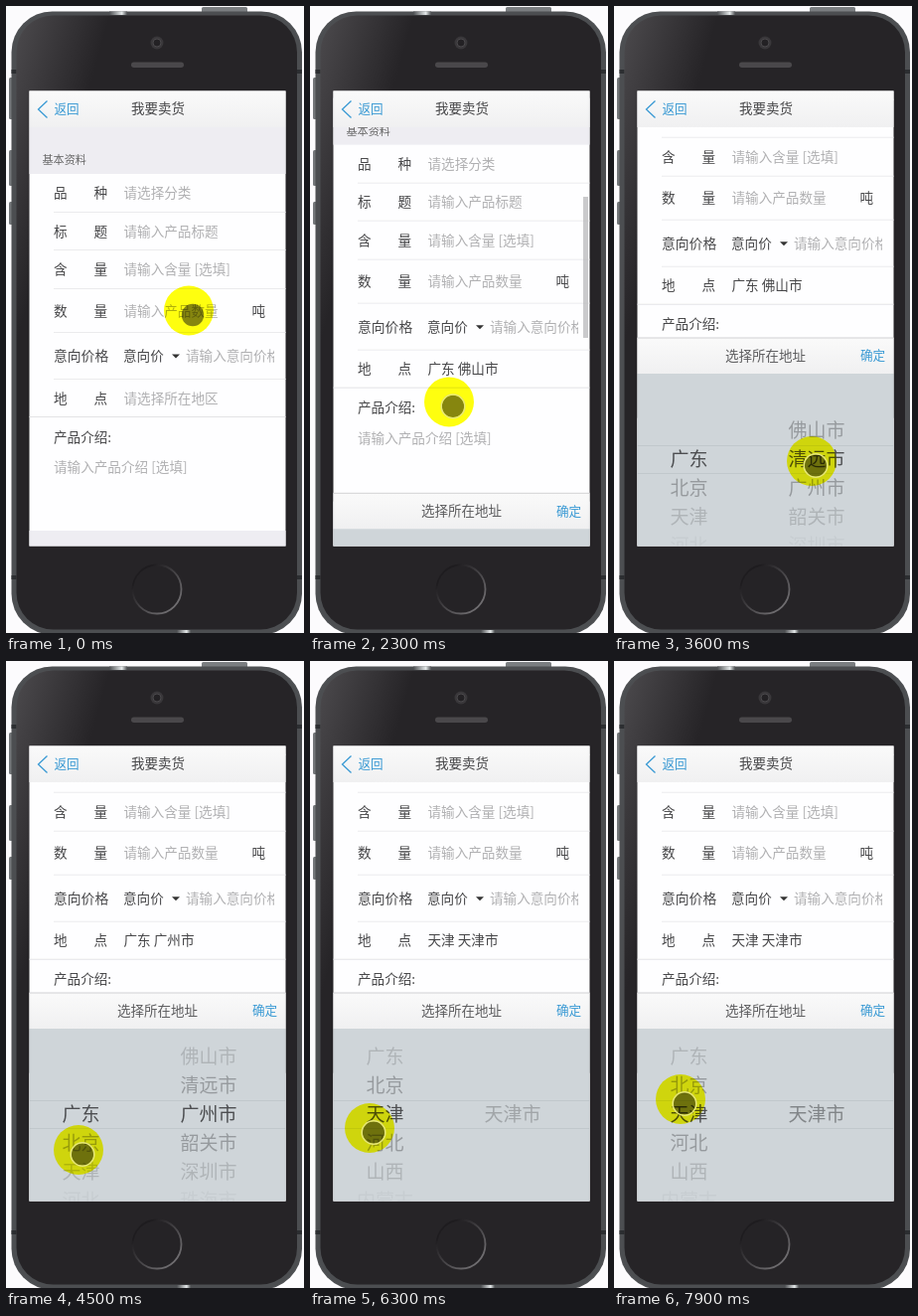
Recreate the animation shown at these times as an HTML page. Size 300 px wide and 631 px high, loop 8 s.

```html
<!DOCTYPE html>
<html lang="zh-CN">
<head>
<meta charset="utf-8">
<style>
html, body { margin: 0; width: 100%; height: 100%; overflow: hidden; background: #fcfbfd; }
svg { display: block; width: 300px; height: 631px; }
text { font-family: "Noto Sans CJK SC", "Noto Sans CJK", sans-serif; font-weight: 300; white-space: pre; }
#cursor { mix-blend-mode: multiply; opacity: .94; }
</style>
</head>
<body>
<svg id="stage" viewBox="0 0 300 631"></svg>
<script>
const LOOP = 8000, ROW = 29, MID = 456, DRAG = 400, GRIP = 26, OPEN = 2250;
const INK = '#464648', HINT = '#b0b0b2', BLUE = '#3a9ad4';

const text = (x, cy, s, size = 13.6, fill = INK, extra = '') =>
  `<text x="${x}" y="${cy + size * 0.38}" font-size="${size}" fill="${fill}" ${extra}>${s}</text>`;
const rect = (x, y, w, h, fill, extra = '') =>
  `<rect x="${x}" y="${y}" width="${w}" height="${h}" fill="${fill}" ${extra}/>`;
const circle = (x, y, r, fill, extra = '') =>
  `<circle cx="${x}" cy="${y}" r="${r}" fill="${fill}" ${extra}/>`;
const gradient = (id, stops, dir = 'x2="0" y2="1"') =>
  `<linearGradient id="${id}" ${dir}>` + stops.map(([o, c]) =>
    `<stop offset="${o}" stop-color="${c}"/>`).join('') + '</linearGradient>';
const clip = (id, x, y, w, h) => `<clipPath id="${id}">${rect(x, y, w, h, '#000')}</clipPath>`;
const line = (x, y, fill = '#ebebed') => rect(x, y, 282 - x, 1, fill);

const defs = `<defs>
  ${gradient('bar', [[0, '#fafafa'], [1, '#f0f0f1']])}
  ${gradient('shine', [[0, '#4c4e51'], [.7, '#e4e8e9'], [1, '#4c4e51']], '')}
  ${gradient('body', [[0, '#4c4a4d'], [.3, '#262427']], 'x2=".8" y2=".5"')}
  ${gradient('home', [[.2, '#1e1c1f'], [1, '#828083']], 'x2="1" y2="1"')}
  ${clip('screen', 23.5, 85.5, 258, 458)}
  ${clip('price', 180, 0, 90, 631)}
  ${clip('wheels', 23.5, 370, 258, 174)}
</defs>`;

const phone =
  rect(197, 1, 46, 7, '#7a7d80', 'rx="1.5"') +
  [[72, 42], [145, 36], [197, 23]].map(([y, h]) => rect(3, y, 6, h, '#737679', 'rx="1.5"')).join('') +
  rect(5.5, 5.5, 292.5, 627, '#4c4e51', 'rx="41"') +
  rect(104, 5.5, 18, 3.5, 'url(#shine)') + rect(172, 628, 14, 3, 'url(#shine)') +
  [64, 573].map(y => rect(5.5, y, 5, 4, '#2c2e31') + rect(293, y, 5, 4, '#2c2e31')).join('') +
  rect(10.5, 9.5, 282.5, 618, 'url(#body)', 'rx="37"') +
  circle(152, 37, 6.5, '#39373a') + circle(152, 37, 4, '#232124', 'stroke="#4b494c"') +
  rect(126, 56.5, 53, 5.5, '#4a484b', 'rx="2.75"') +
  circle(152, 587, 24.5, '#252326', 'stroke="url(#home)" stroke-width="1.8"');

const field = ([cy, a, b, hint, id = '']) =>
  text(48, cy, a) + text(88.5, cy, b) + text(118.5, cy, hint, 13.6, HINT, id);

const form = `<g id="form">
  ${rect(23, 122, 259, 47, '#eeedf2')}
  ${text(36.5, 155, '基本资料', 11.1, '#666')}
  ${[207, 245, 284, 328, 375].map(y => line(48, y)).join('')}${line(23, 413, '#e3e3e5')}
  ${[[188, '品', '种', '请选择分类'],
     [226.5, '标', '题', '请输入产品标题'],
     [265, '含', '量', '请输入含量 [选填]'],
     [306.5, '数', '量', '请输入产品数量'],
     [394.5, '地', '点', '', 'id="place"']].map(field).join('')}
  ${text(247.5, 306.5, '吨')}
  ${text(48, 352, '意向价格', 13.8)}${text(118, 352, '意向价')}
  <path d="M167 350.5h8l-4 4z" fill="#333"/>
  <g clip-path="url(#price)">${text(181, 352, '请输入意向价格', 13.6, HINT)}</g>
  ${text(48, 433.5, '产品介绍:')}
  ${text(48, 464, '请输入产品介绍 [选填]', 13.6, HINT)}
  ${rect(23, 528, 259, 130, '#eeedf2')}
</g>`;

const header = rect(23, 85, 259, 37, 'url(#bar)') +
  `<path d="M41.5 95.5l-9 8.5 9 8.5" fill="none" stroke="${BLUE}" stroke-width="1.3"/>` +
  text(48.5, 103, '返回', 12.6, BLUE) + text(126, 103, '我要卖货', 13.5);

const sheet = `<g id="sheet">
  ${rect(23, 334, 259, 36, 'url(#bar)')}${line(23, 333.5, '#d2d2d4')}
  ${text(112, 351.5, '选择所在地址', 13.5, '#5c5c5e')}${text(248, 351.5, '确定', 12.6, BLUE)}
  ${rect(23, 370, 259, 174, '#cfd5d9')}${line(23, 442, '#c1c8cc')}${line(23, 470, '#c1c8cc')}
  <g clip-path="url(#wheels)"><g id="left"></g><g id="right"></g></g>
</g>`;

const $ = id => document.getElementById(id);
$('stage').innerHTML = defs + phone + `<g clip-path="url(#screen)">
  ${rect(23, 85, 259, 459, '#fefeff')}${form}${header}
  ${rect(275, 192, 5, 142, '#b9b9bb', 'id="scrollbar"')}${sheet}</g>
  <g id="cursor">${circle(0, 0, 25, '#ff0')}${circle(4, 4.5, 11.2, '#808000')}</g>
  ${circle(4, 4.5, 11.8, 'none', 'id="ring" stroke="#e6e678" stroke-width="1.5"')}`;

const provinces = ['广东', '北京', '天津', '河北', '山西', '内蒙古', '辽宁', '吉林'];
const cities = [
  ['佛山市', '清远市', '广州市', '韶关市', '深圳市', '珠海市'],
  ['北京市'],
  ['天津市'],
  ['石家庄市', '唐山市', '秦皇岛市', '邯郸市']
];

// Each drag: start time, release point, wheel and rows turned.
const drags = [
  { at: 3400, x: 196, y: 432, wheel: 'right', rows: 2 },
  { at: 4850, x: 67, y: 466, wheel: 'left', rows: 1 },
  { at: 5850, x: 60, y: 470, wheel: 'left', rows: 1 },
  { at: 6430, x: 72, y: 461, wheel: 'left', rows: 1 },
  { at: 7370, x: 67, y: 441, wheel: 'left', rows: -1 }
];

// Cursor keys [time, x, y]: the opening glide, then rest, travel and drag for each gesture.
const path = [[0, 184, 306.5], [900, 149, 374], [1500, 145, 350], [1800, 140, 399], [2700, 140, 398]];
for (const d of drags) {
  const [free, x, y] = path[path.length - 1], gap = d.at - free;
  const grab = [d.x + 6, d.y + d.rows * GRIP];
  d.reach = free + gap * .65;
  path.push([free + gap * .5, x, y], [d.reach, ...grab], [d.at, ...grab], [d.at + DRAG, d.x, d.y]);
}

function ramp(t, from, to) {
  const u = Math.min(1, Math.max(0, (t - from) / (to - from)));
  return u * u * (3 - 2 * u);
}

function cursorAt(t) {
  const i = path.findIndex(k => k[0] > t);
  if (i < 0) return path[path.length - 1].slice(1);
  const [t0, x0, y0] = path[i - 1], [t1, x1, y1] = path[i], e = ramp(t, t0, t1);
  return [x0 + (x1 - x0) * e, y0 + (y1 - y0) * e];
}

const turned = (wheel, share) =>
  drags.reduce((sum, d) => sum + (d.wheel === wheel ? d.rows * share(d) : 0), 0);

const wheelRows = (items, x, pos, alpha = 1) => items.map((s, i) => {
  const d = Math.abs(i - pos), a = Math.max(.75 - .43 * d, .46 - .14 * d, 0) * alpha;
  return text(x, MID + (i - pos) * ROW, s, 19, '#222224', `text-anchor="middle" opacity="${a.toFixed(3)}"`);
}).join('');

function draw(t) {
  const open = ramp(t, 2150, 2600), chosen = t >= OPEN;
  const moving = d => ramp(t, d.at, d.at + DRAG), done = d => t >= d.at + DRAG ? 1 : 0;
  const province = turned('left', done), list = cities[province];
  const city = province ? 0 : turned('right', done);
  const last = drags.filter(d => d.wheel === 'left' && done(d)).pop();

  $('form').setAttribute('transform', `translate(0 ${-113.3 * open})`);
  $('sheet').setAttribute('transform', `translate(0 ${211 * (1 - open)})`);
  $('scrollbar').setAttribute('opacity', ramp(t, 2200, 2350) - ramp(t, 3100, 3400));
  $('place').textContent = chosen ? `${provinces[province]} ${list[city]}` : '请选择所在地区';
  $('place').setAttribute('fill', chosen ? INK : HINT);

  const fresh = last ? ramp(t, last.at + DRAG - 150, last.at + DRAG + 350) : 1;
  $('left').innerHTML = wheelRows(provinces, 75.5, turned('left', moving));
  $('right').innerHTML = wheelRows(list, 204, province ? 0 : turned('right', moving), fresh);

  const down = t >= 1900 && t < 3000 || drags.some(d => t >= d.reach && t < d.at + DRAG + 260);
  const place = `translate(${cursorAt(t)})`;
  $('cursor').setAttribute('transform', place);
  $('ring').setAttribute('transform', place);
  $('ring').setAttribute('visibility', down ? 'visible' : 'hidden');
}

let start;
function frame(now) {
  start ??= now;
  draw((now - start) % LOOP);
  requestAnimationFrame(frame);
}
draw(0);
requestAnimationFrame(frame);
</script>
</body>
</html>
```
